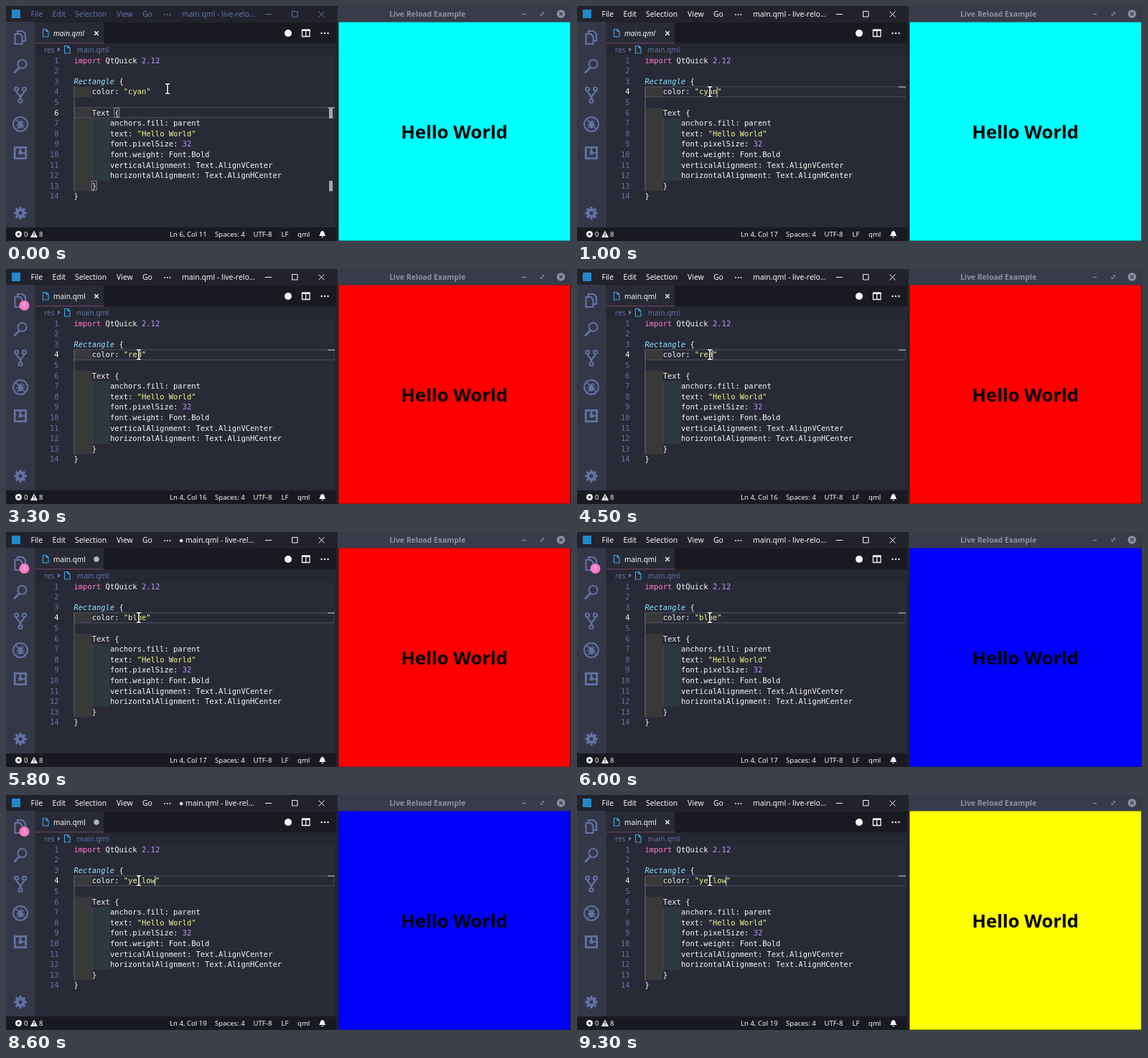
These frames come from a looping animation (787x328 px, 9400 ms). An HTML page:

```html
<!DOCTYPE html>
<html lang="en">
<head>
<meta charset="utf-8">
<title>Live Reload Example</title>
<style>
html, body { margin: 0; width: 100%; height: 100%; overflow: hidden; background: #282a36; }
svg { display: block; width: 787px; height: 328px; }
text { white-space: pre; }
.ui { font: 10.4px "Noto Sans", sans-serif; fill: #f8f8f2; }
.tab { font: 10.1px "Noto Sans", sans-serif; fill: #f8f8f2; }
.st { font: 9.6px "Noto Sans", sans-serif; fill: #f8f8f2; }
.code { font: 10.46px "DejaVu Sans Mono", monospace; fill: #f8f8f2; }
.dim { fill: #6272a4; }
.line { fill: none; stroke: #f8f8f2; }
.act { fill: none; stroke: #6272a4; stroke-width: 2.2; }
#bar .ui, #bar circle { fill: currentColor; }
#bar .line { stroke: currentColor; }
</style>
</head>
<body>
<svg id="stage" viewBox="0 0 787 328"></svg>
<script>
const LOOP = 9400, X0 = 94.5, CW = 6.3, LH = 14.58;
const FG = "#f8f8f2", DIM = "#6272a4", PINK = "#ff79c6", CYAN = "#8be9fd", PURPLE = "#bd93f9", YELLOW = "#f1fa8c";
const colX = c => X0 + CW * c;
const base = n => 79.7 + LH * (n - 1);
const rowY = n => 68.9 + LH * (n - 1);

const rect = (x, y, w, h, fill, more = "") =>
  `<rect x="${x}" y="${y}" width="${w}" height="${h}" fill="${fill}" ${more}/>`;
const text = (x, y, s, cls = "ui", more = "") =>
  `<text x="${x}" y="${y}" class="${cls}" ${more}>${s}</text>`;
const path = (d, cls = "line", more = "") => `<path d="${d}" class="${cls}" ${more}/>`;
const circle = (x, y, r, fill, more = "") => `<circle cx="${x}" cy="${y}" r="${r}" fill="${fill}" ${more}/>`;
const ring = (x, y, r, w = 2) => circle(x, y, r, "none", `stroke="${DIM}" stroke-width="${w}"`);

// line, column, text, colour, extra style
const tokens = [
  [1, 0, "import", PINK], [1, 7, "QtQuick", FG], [1, 15, "2.12", PURPLE],
  [3, 0, "Rectangle", CYAN, "font-style:italic"], [3, 10, "{", FG],
  [4, 4, "color:", FG],
  [6, 4, "Text {", FG],
  [7, 8, "anchors.fill: parent", FG],
  [8, 8, "text:", FG], [8, 14, '"Hello World"', YELLOW],
  [9, 8, "font.pixelSize:", FG], [9, 24, "32", PURPLE],
  [10, 8, "font.weight: Font.Bold", FG],
  [11, 8, "verticalAlignment: Text.AlignVCenter", FG],
  [12, 8, "horizontalAlignment: Text.AlignHCenter", FG],
  [13, 4, "}", FG], [14, 0, "}", FG]
];

function fileIcon(x, y) {
  return path(`M${x} ${y}h4.5l3 3v7.5h-7.5zM${x + 4.5} ${y}v3h3`, "line", 'style="stroke:#3fa0e0" stroke-width="1.2"');
}

function gear(x, y) {
  let teeth = "";
  for (let a = 0; a < 360; a += 45)
    teeth += rect(x - 1.7, y - 8.8, 3.4, 4, DIM, `transform="rotate(${a} ${x} ${y})"`);
  return teeth + ring(x, y, 4.5, 4);
}

function activityBar() {
  return rect(0, 22, 40.5, 287, "#343746") +
    path("M16 39v-4h7l4 4v10h-4M12.5 39h7l3 3.5v10.5h-10z", "act") +
    path("M18.5 86L11 93.5", "act", 'style="stroke-width:3"') + ring(22.5, 81, 6) +
    ring(14.5, 116, 2.6) + ring(25.5, 116, 2.6) + ring(20, 132.5, 2.6) +
    path("M14.5 118.5c0 5 5.5 4 5.5 11M25.5 118.5c0 5 -5.5 4 -5.5 11", "act") +
    ring(20, 165, 10) + `<ellipse cx="20" cy="166" rx="3.5" ry="5" class="dim"/>` +
    path("M13 158l14 14M14 166h12M15 171l3-2M25 161l-3 2M18 160l1 2M22 159l-1 2", "act", 'style="stroke-width:1.5"') +
    path("M12.3 197.3h15.4v15.4h-15.4z", "act", 'style="stroke-width:2.8"') +
    rect(17.5, 202.5, 5, 5, DIM) + path("M20 197v6M22 205h6", "act") +
    gear(20, 289);
}

function titleBar() {
  let s = "";
  [[34.5, "File"], [64.5, "Edit"], [96, "Selection"], [154, "View"], [190, "Go"]]
    .forEach(([x, w]) => s += text(x, 15, w));
  for (const x of [221, 224.7, 228.4]) s += circle(x, 12, 0.95, FG);
  s += path("M361 11.5h9M398.5 7.5h7.5v7.5h-7.5zM435.5 7.5l8 8m0 -8l-8 8");
  return rect(0, 0, 460, 23, "#21222c") + rect(8, 5, 12, 12, "#2488c8") +
    `<g id="bar">${s}${text(245, 15, "", "ui", 'id="title"')}</g>`;
}

function editor() {
  let s = rect(0, 0, 460, 328, "#282a36") + titleBar() +
    rect(40.5, 23, 419.5, 29.5, "#191a21") + rect(40.5, 23, 95.5, 29.5, "#282a36") +
    rect(40.5, 51.5, 95.5, 1, PINK, 'opacity=".5"') + fileIcon(51.5, 32.5) +
    circle(393, 38, 5, FG) +
    path("M412.5 33.5h10.5v9h-10.5zM417.7 33v9.5", "line", 'stroke-width="1.3"') +
    rect(412, 32.5, 11.5, 2.5, FG);
  for (const x of [439.5, 444, 448.5]) s += circle(x, 38, 1.2, FG);
  s += rect(40.5, 52.5, 419.5, 16, "#252731") +
    text(53, 64.5, "res", "tab dim") + path("M72 57.5l4 3.3l-4 3.3z", "dim") +
    fileIcon(81.5, 55.5) + text(98.5, 64.5, "main.qml", "tab dim");
  return s + activityBar();
}

function statusBar() {
  return rect(0, 309, 460, 19, "#191a21") +
    circle(17.5, 318.5, 4.5, FG) + path("M15.8 316.8l3.4 3.4m0 -3.4l-3.4 3.4", "line", 'style="stroke:#191a21" stroke-width="1.2"') +
    text(25, 322, "0", "st") + path("M39 313.5l5 9.5h-10z", "", `fill="${FG}"`) +
    rect(38.4, 316.5, 1.2, 3, "#191a21") + rect(38.4, 320.5, 1.2, 1.2, "#191a21") +
    text(46, 322, "8", "st") + text(228, 322, "", "st", 'id="pos"') +
    text(291, 322, "Spaces: 4", "st") + text(344.5, 322, "UTF-8", "st") +
    text(383.5, 322, "LF", "st") + text(406, 322, "qml", "st") +
    path("M436 321c2 -1.5 1.3 -7 4.7 -7s2.7 5.5 4.7 7zM439 322h3.4l-1.7 1.5z", "", `fill="${FG}"`);
}

function code() {
  let s = rect(X0, rowY(4), CW * 4, LH, "#39393a") + rect(X0, rowY(6), CW * 4, LH * 8, "#39393a") +
    rect(colX(4), rowY(7), CW * 4, LH * 6, "#2d393f") +
    rect(X0, rowY(4), 1, LH * 10, "#62646c") + rect(colX(4), rowY(7), 1, LH * 6, "#414a50") +
    `<rect id="row" x="95" width="363" height="14" fill="none" stroke="#51535f"/>` +
    `<rect id="caret" width="1" height="13.5" fill="#d0d0cc"/>`;
  for (let n = 1; n < 15; n++)
    s += text(73.5, base(n), n, "code dim", `id="n${n}" text-anchor="end"`);
  for (const [n, c, w, fill, more = ""] of tokens)
    s += text(colX(c), base(n), w, "code", `style="fill:${fill};${more}"`);
  const box = (n, c) => rect(colX(c) - .3, rowY(n) + .6, CW + .5, LH - 1.5, "none", 'stroke="#9a9ba2" stroke-width=".8"');
  return s + text(colX(11), base(4), "", "code", `id="word" style="fill:${YELLOW}"`) +
    `<g id="match">${box(6, 9)}${box(13, 4)}` +
    rect(450, 142, 5, 15, "#a5a6a8") + rect(450, 244, 5, 14.5, "#a5a6a8") + `</g>` +
    rect(458, 68, 1, 241, "#20212b") +
    `<rect id="mark" x="448" width="10" height="1.5" fill="#9c9da3"/>`;
}

function preview() {
  return rect(460, 0, 327, 328, "#22242c") + rect(462, 0, 325, 22.5, "#383c4a") +
    text(587, 15, "Live Reload Example", "ui", 'text-anchor="middle" style="font-weight:bold;fill:#8d929c"') +
    path("M718.5 11.5h5.5", "line", 'style="stroke:#8d929c" stroke-width="1.2"') +
    path("M746 8.5h3.5v3.5zM744.5 10v3.5h3.5z", "", 'fill="#8d929c"') +
    circle(773, 11, 5.8, "#8d929c") +
    path("M770.8 8.8l4.4 4.4m0 -4.4l-4.4 4.4", "line", 'style="stroke:#383c4a" stroke-width="1.3"') +
    `<rect id="fill" x="463.4" y="22.5" width="322.4" height="305"/>` +
    `<text x="624.5" y="185.3" text-anchor="middle" style="font:bold 25.6px 'Noto Sans',sans-serif">Hello World</text>`;
}

const beam = "M-2.5 -6q2.5 0 2.5 1.5v9q0 1.5 -2.5 1.5M2.5 -6q-2.5 0 -2.5 1.5v9q0 1.5 2.5 1.5";
document.getElementById("stage").innerHTML = editor() + statusBar() + code() +
  text(66, 42, "main.qml", "tab", 'id="tab"') +
  path("M123.3 35.3l5.4 5.4m0 -5.4l-5.4 5.4", "line", 'id="close" stroke-width="1.5"') +
  circle(126, 38, 3.7, "#b4b5b9", 'id="dot"') +
  `<g id="badge">${circle(25.5, 51, 7, PINK)}${text(25.5, 54.2, "1", "st", 'text-anchor="middle" style="font-size:9px"')}</g>` +
  preview() +
  `<g id="mouse">${path(beam, "line", 'style="stroke:#111" stroke-width="2.8"')}${path(beam, "line", 'stroke-width="1.4"')}</g>`;

const el = {};
document.querySelectorAll("[id]").forEach(e => el[e.id] = e);

const CLICK = 900;
const edits = [[0, "cyan"]];
const erase = (w, at, gap) => {
  for (let i = 1; i <= w.length; i++) edits.push([at + gap * (i - 1), w.slice(0, -i)]);
};
const type = (w, at, gap) => {
  for (let i = 1; i <= w.length; i++) edits.push([at + gap * (i - 1), w.slice(0, i)]);
};
erase("cyan", 1300, 100);
type("red", 1880, 300);
erase("red", 4600, 120);
type("blue", 4980, 100);
erase("blue", 6700, 120);
type("yellow", 7540, 150);

// first edit, save, resulting colour
const rounds = [[1300, 3150, "#ff0000"], [4600, 6000, "#0000ff"], [6700, 8950, "#ffff00"]];
const show = (e, on) => e.setAttribute("visibility", on ? "visible" : "hidden");
const set = (e, props) => { for (const k in props) e.setAttribute(k, props[k]); };

function draw(t) {
  const [at, word] = edits.filter(e => e[0] <= t).pop();
  const focused = t >= CLICK;
  const line = focused ? 4 : 6, col = focused ? 12 + word.length : 10;
  const dirty = rounds.some(r => t >= r[0] && t < r[1]);
  const saved = rounds.filter(r => t >= r[1]).pop();

  el.word.textContent = `"${word}"`;
  el.pos.textContent = `Ln ${line}, Col ${col + 1}`;
  el.title.textContent = dirty ? "● main.qml - live-rel…" : "main.qml - live-relo…";
  set(el.title, { x: dirty ? 241 : 245 });
  el.bar.style.color = focused ? FG : DIM;
  el.tab.style.fontStyle = t < rounds[0][0] ? "italic" : "normal";
  show(el.close, !dirty);
  show(el.dot, dirty);
  show(el.badge, rounds.some(r => t >= r[0] + 300 && t < r[1] + 250));
  show(el.match, !focused);
  show(el.caret, focused && (t - Math.max(at, CLICK)) % 1000 < 500);
  set(el.caret, { x: colX(col) - .6, y: rowY(line) + .5 });
  set(el.row, { y: Math.round(rowY(line)) - .2 });
  set(el.mark, { y: Math.round(rowY(line)) - .7 });
  for (const n of [4, 6]) el["n" + n].style.fill = n === line ? FG : "";
  set(el.fill, { fill: saved ? saved[2] : "#00ffff" });

  const p = Math.min(1, Math.max(0, (t - 250) / 500)), k = p * p * (3 - 2 * p);
  set(el.mouse, { transform: `translate(${225 - 40 * k} ${115.5 + 4 * k}) scale(1.15)` });
}

function tick() {
  draw(performance.now() % LOOP);
  requestAnimationFrame(tick);
}
tick();
</script>
</body>
</html>
```
